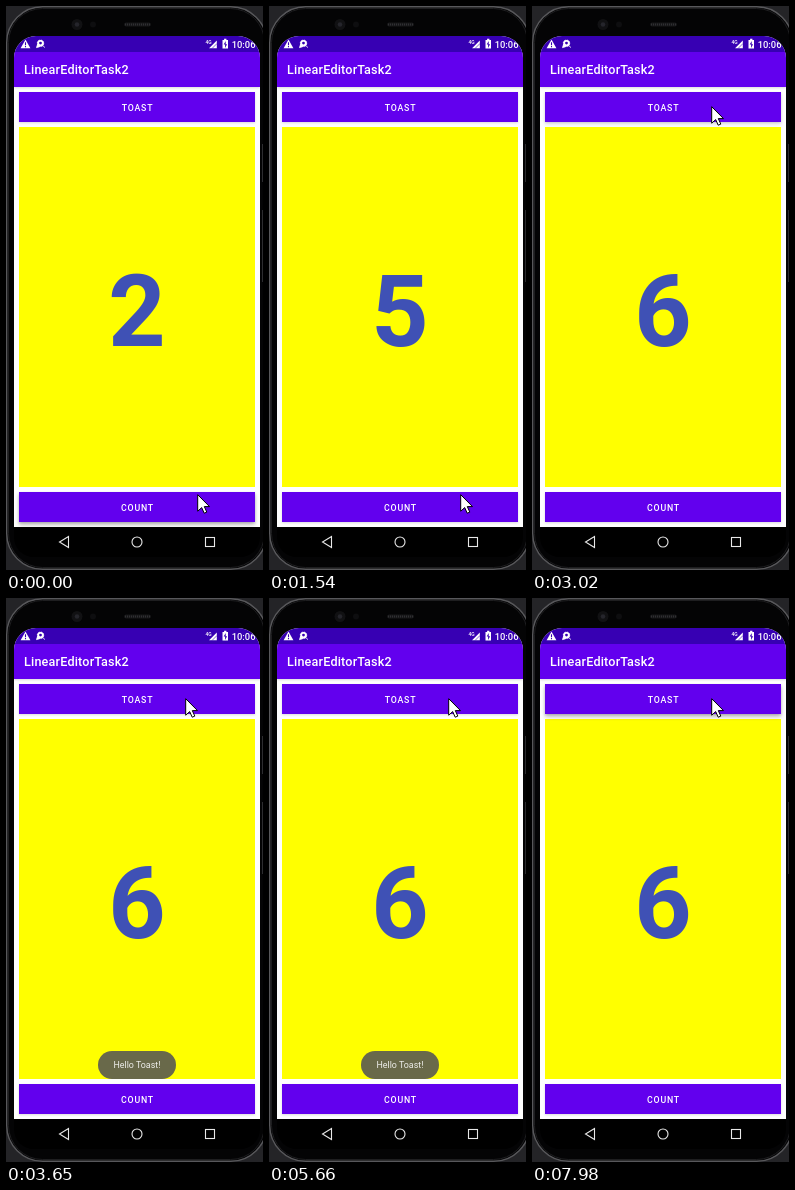
Recreate the animation shown at these times as an HTML page. Size 257x564 px, loop 8000 ms.

```html
<!DOCTYPE html>
<html lang="en">
<head>
<meta charset="utf-8">
<title>Counter app</title>
<style>
  html, body { margin: 0; width: 100%; height: 100%; overflow: hidden; background: #242427; }
  svg { display: block; width: 257px; height: 564px; }
  text { font-family: Roboto, "Noto Sans", sans-serif; fill: #fff; }
  .title { font-size: 12.6px; font-weight: 500; letter-spacing: .015em; }
  .label { font-size: 8.8px; font-weight: 500; letter-spacing: .089em; text-anchor: middle; }
  .clock { font-size: 9.4px; font-weight: 500; }
  .digits text { font-size: 100px; font-weight: 700; fill: #3f51b5; text-anchor: middle; }
  .hint { font-size: 8.9px; text-anchor: middle; }
  .button { fill: #6200ee; }
  .rest { fill: #000; opacity: .14; filter: blur(.8px); }
  .lift { fill: #000; opacity: 0; filter: blur(2px); }

  /* Every change is a hard step on one shared 8 s clock. */
  .digits, .lift, .toast, .cursor { animation: 8s step-end infinite; }
  .digits { animation-name: digits; }
  .count .lift { animation-name: count-press; }
  .toaster .lift { animation-name: toast-press; }
  .toast { animation-name: toast; }
  .cursor { animation-name: cursor; }

  @keyframes digits {
    0% { transform: translateY(0); }
    3.375% { transform: translateY(-400px); }
    11.25% { transform: translateY(-800px); }
    17.625% { transform: translateY(-1200px); }
    26%, 100% { transform: translateY(-1600px); }
  }
  @keyframes count-press {
    0%, 9.75%, 16%, 24.5% { opacity: .24; }
    3.375%, 11.25%, 19.25%, 27.875%, 100% { opacity: 0; }
  }
  @keyframes toast-press {
    0%, 42.25%, 56.375% { opacity: 0; }
    37.75%, 98.25% { opacity: .08; }
    39.25%, 53.375%, 99.75%, 100% { opacity: .24; }
  }
  @keyframes toast {
    0% { opacity: 0; }
    40.75% { opacity: .15; }
    42.25% { opacity: .45; }
    44.125% { opacity: .85; }
    45.625% { opacity: 1; }
    92% { opacity: .7; }
    93.5% { opacity: .3; }
    95.125%, 100% { opacity: 0; }
  }
  @keyframes cursor {
    0% { transform: translate(191px, 488px); }
    27.875% { transform: translate(183px, 224px); }
    29.75% { transform: translate(181px, 122px); }
    31.25% { transform: translate(180px, 105px); }
    32.75%, 100% { transform: translate(179px, 100px); }
  }
</style>
</head>
<body>
<svg viewBox="0 0 257 564">
  <defs>
    <clipPath id="screen"><path d="M8 521V52a22 22 0 0 1 22-22H232a22 22 0 0 1 22 22V521z"/></clipPath>
    <clipPath id="panel"><rect x="13" y="121" width="236" height="360"/></clipPath>
  </defs>

  <!-- phone body -->
  <rect x=".7" y=".7" width="260" height="562.6" rx="36" fill="#040405" stroke="#58585b" stroke-width="1.4"/>
  <rect x="2.5" y="2.5" width="256" height="559" rx="34" fill="#040405" stroke="#1e1e20"/>
  <path d="M256.5 138v38M256.5 204v72" stroke="#2c2c2f"/>
  <circle cx="71" cy="18.5" r="5.5" fill="#111113"/>
  <circle cx="71" cy="18.5" r="2.3" fill="#25252b"/>
  <circle cx="87" cy="18.5" r="3" fill="#0e0e10"/>
  <rect x="118" y="16.5" width="27" height="4" rx="2" fill="#161618"/>
  <path d="M119 18.5h25" stroke="#303033" stroke-width="2" stroke-dasharray="1 1"/>
  <path d="M8 521h246v10a20 20 0 0 1-20 20H28a20 20 0 0 1-20-20z"/>

  <g clip-path="url(#screen)">
    <rect x="8" y="30" width="246" height="491" fill="#fff"/>
    <rect class="rest" x="8" y="47" width="246" height="35"/>
    <rect x="8" y="30" width="246" height="16" fill="#3700b3"/>
    <rect x="8" y="46" width="246" height="35" fill="#6200ee"/>

    <!-- status icons -->
    <path d="M19.5 33.4l4.9 8.8h-9.8z" fill="#fff"/>
    <path d="M19.5 36.2v3M19.5 40v1.2" stroke="#3700b3" stroke-width="1.1"/>
    <circle cx="34.5" cy="37.3" r="3.2" fill="#fff" stroke="#fff" stroke-dasharray="1.5 1"/>
    <path d="M30.5 41.6l1-3 2 2.2zM37 39.8l2 1.8" fill="#fff" stroke="#fff" stroke-width=".8"/>
    <circle cx="34.5" cy="37.1" r="1.4" fill="#3700b3"/>
    <text x="199.5" y="38" font-size="5" font-weight="500">4G</text>
    <path d="M210.8 34.5v7.7h-7.7z" fill="#fff"/>
    <path d="M206 42.5l5-5" stroke="#3700b3" stroke-width=".6"/>
    <path d="M216.5 34h1.6v-1.2h2.3V34h1.6v8.4h-5.5z" fill="#fff"/>
    <path d="M219.7 35l-2 3.6h1.4V42l2-3.8h-1.4z" fill="#3700b3"/>
    <text class="clock" x="225.7" y="41.5">10:06</text>

    <text class="title" x="18" y="68.2">LinearEditorTask2</text>
    <rect x="13" y="121" width="236" height="360" fill="#ff0"/>
    <g clip-path="url(#panel)">
      <g class="digits">
        <text x="131" y="340.4">2</text>
        <text x="131" y="740.4">3</text>
        <text x="131" y="1140.4">4</text>
        <text x="131" y="1540.4">5</text>
        <text x="131" y="1940.4">6</text>
      </g>
    </g>

    <g class="toaster">
      <rect class="rest" x="13" y="87" width="236" height="30"/>
      <rect class="lift" x="13" y="89" width="236" height="30"/>
      <rect class="button" x="13" y="86" width="236" height="30"/>
      <text class="label" x="131.5" y="105">TOAST</text>
    </g>
    <g class="count">
      <rect class="rest" x="13" y="487" width="236" height="30"/>
      <rect class="lift" x="13" y="489" width="236" height="30"/>
      <rect class="button" x="13" y="486" width="236" height="30"/>
      <text class="label" x="131.5" y="504.6">COUNT</text>
    </g>

    <g class="toast">
      <rect x="92" y="453" width="78" height="28" rx="14" fill="#69694a"/>
      <text class="hint" x="131" y="470.4" style="fill:#eeeeea">Hello Toast!</text>
    </g>
  </g>

  <!-- navigation -->
  <g fill="none" stroke="#e8e8e8" stroke-width="1.1">
    <path d="M62.5 530.5v11l-9-5.5z"/>
    <circle cx="131" cy="536" r="5"/>
    <rect x="199.5" y="531.5" width="9" height="9"/>
  </g>

  <path class="cursor" d="M.7 .7V17.2l4-3.6 2.5 5.6 2.6-1.1-2.5-5.5h5.2z" fill="#fff" stroke="#000"/>
</svg>
</body>
</html>
```
